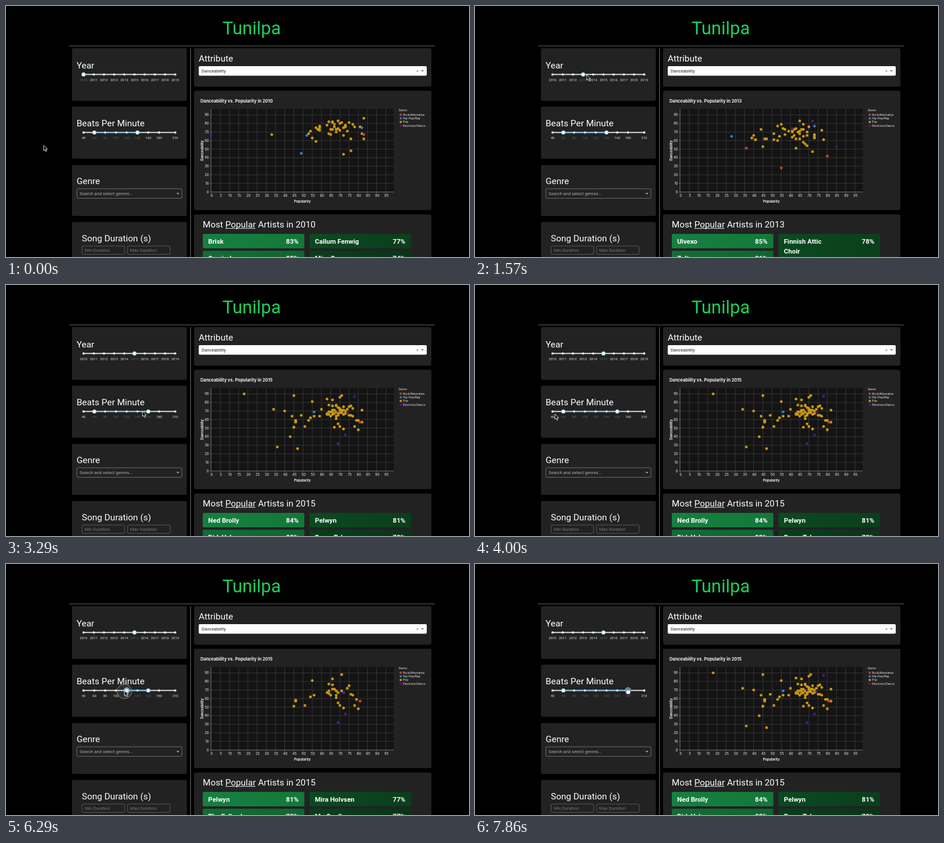
These frames come from a looping animation (800x434 px, 8 s). An HTML page with a canvas:

```html
<!DOCTYPE html>
<html lang="en">
<head>
<meta charset="utf-8">
<title>Music dashboard</title>
<style>
html, body { margin: 0; width: 100%; height: 100%; overflow: hidden; background: #000; }
canvas { display: block; width: 800px; height: 434px; }
</style>
</head>
<body>
<canvas id="stage"></canvas>
<script>
const W = 800, H = 434, LOOP = 8000, STEP = 1000 / 7;
const canvas = document.getElementById('stage');
const ctx = canvas.getContext('2d');
const ratio = window.devicePixelRatio || 1;
canvas.width = W * ratio;
canvas.height = H * ratio;

const PANEL = '#222', WHITE = '#fff', DIM = '#5c5c5c', BLUE = '#82c4ea', GRID = '#3e3e3e';
const GENRES = {
  rock: ['Rock/Alternative', '#cb4428'],
  hip: ['Hip-Hop/Rap', '#2c7fc9'],
  pop: ['Pop', '#c9970f'],
  edm: ['Electronic/Dance', '#4a1c82']
};

// Clouds: count, mean and spread of popularity, mean and spread of danceability.
// Lone songs stand apart from the clouds.
const YEARS = {
  2010: {
    clouds: [[40, 67, 7, 72, 7]], edm: 0,
    lone: { pop: [[33, 67], [72, 44], [76, 48]], hip: [[49, 45], [52, 66], [82, 75]], rock: [[83, 67]], edm: [[0, 67]] }
  },
  2013: {
    clouds: [[12, 47, 5, 65, 6], [38, 66, 6, 66, 9]], edm: 0.05,
    lone: { hip: [[28, 65], [73, 77]], rock: [[36, 51], [55, 28], [80, 42]], edm: [[72, 83], [85, 53]] }
  },
  2015: {
    clouds: [[16, 48, 6, 66, 11], [60, 70, 6, 69, 9]], edm: 0.05,
    lone: { pop: [[18, 90], [34, 72], [36, 28], [47, 26]], hip: [[56, 69]], rock: [[81, 57]], edm: [[69, 32], [73, 42]] }
  }
};

const ARTISTS = {
  2010: ['Brisk|83', 'Callum Fenwig|77', 'Ozmirel|83', 'Miss Dovra|74'],
  2013: ['Ulvexo|85', 'Finnish Attic/Choir|78', 'Zu!t|81'],
  2015: ['Ned Brolly|84', 'Pelwyn|81', 'Dirk Valsen|83', 'Kip Zonto|77'],
  wide: ['Ned Brolly|84', 'Pelwyn|81', 'Dirk Valsen|83', 'Bryce Talvor|78'],
  fast: ['Pelwyn|81', 'Mira Holvsen|77', 'The Fallowk|79', 'Mr. Quolb|77']
};

// Cursor tip: time, x, y
const path = [
  [200, 65, 241], [950, 188, 119], [1570, 193, 119], [2150, 220, 119], [2450, 220, 119],
  [2850, 228, 217], [3200, 246, 217], [3720, 106, 234], [4000, 138, 223], [4400, 153, 217],
  [5140, 185, 217], [5700, 187, 218], [6400, 206, 219], [7100, 153, 217], [7570, 246, 217],
  [7860, 264, 217]
];
const clicks = [1000, 2200];
const lowDrags = [[4400, 7100]];
const highDrags = [[2850, 3200], [7570, LOOP]];
const updates = [0, ...clicks, 3250, 5400, 7250];

const clamp = (v, a, b) => Math.min(b, Math.max(a, v));
const within = (t, spans) => spans.some(([a, b]) => t >= a && t < b);
const px = p => 354.3 + p * 3.18;
const py = d => 321.5 - d * 1.48;
const bpmX = v => 134 + (v - 40) * 0.932;
const yearX = v => 134 + (v - 2010) * 17.6;
const range = (n, f) => Array.from({ length: n }, (_, i) => f(i));

function random(seed) {
  return () => {
    seed = (seed * 16807) % 2147483647;
    return seed / 2147483647;
  };
}

function makeSongs(year) {
  const { clouds, edm, lone } = YEARS[year];
  const rnd = random(year * 31);
  const spread = () => (rnd() + rnd() + rnd() - 1.5) * 2;
  const songs = [];
  for (const [n, p, sp, d, sd] of clouds)
    for (let i = 0; i < n; i++)
      songs.push({
        p: Math.min(84, Math.round(p + spread() * sp)),
        d: Math.min(88, Math.round(d + spread() * sd)),
        genre: rnd() < edm ? 'edm' : 'pop',
        bpm: 60 + rnd() * 80
      });
  for (const [genre, spots] of Object.entries(lone))
    for (const [p, d] of spots)
      songs.push({ p, d, genre, bpm: genre === 'rock' || genre === 'edm' ? 120 : 80 });
  return songs;
}
const library = Object.fromEntries(Object.keys(YEARS).map(y => [y, makeSongs(+y)]));

function cursorAt(t) {
  const i = path.findIndex(k => k[0] > t);
  if (i < 1) return (i ? path[path.length - 1] : path[0]).slice(1);
  const [t0, x0, y0] = path[i - 1], [t1, x1, y1] = path[i];
  const u = (t - t0) / (t1 - t0), e = u * u * (3 - 2 * u);
  return [x0 + (x1 - x0) * e, y0 + (y1 - y0) * e];
}

// A dragged handle snaps to the mark nearest the cursor
function dragged(t, drags, rest) {
  const drag = drags.filter(d => d[0] <= t).pop();
  if (!drag) return rest;
  const x = cursorAt(Math.min(t, drag[1]))[0];
  return 40 + 20 * Math.round((x - 134) / 0.932 / 20);
}

function stateAt(t) {
  const click = clicks.filter(c => c <= t).pop();
  return {
    year: click ? 2010 + Math.round((cursorAt(click)[0] - 134) / 17.6) : 2010,
    lo: dragged(t, lowDrags, 60),
    hi: dragged(t, highDrags, 140)
  };
}

function box(x, y, w, h, fill, r = 3, stroke) {
  ctx.beginPath();
  ctx.roundRect(x, y, w, h, r);
  if (fill) { ctx.fillStyle = fill; ctx.fill(); }
  if (stroke) { ctx.strokeStyle = stroke; ctx.lineWidth = 0.8; ctx.stroke(); }
}

function line(x0, y0, x1, y1, color, width = 0.8) {
  ctx.strokeStyle = color;
  ctx.lineWidth = width;
  ctx.beginPath();
  ctx.moveTo(x0, y0);
  ctx.lineTo(x1, y1);
  ctx.stroke();
}

function dot(x, y, r, fill, stroke, width = 1) {
  ctx.beginPath();
  ctx.arc(x, y, r, 0, Math.PI * 2);
  if (fill) { ctx.fillStyle = fill; ctx.fill(); }
  if (stroke) { ctx.strokeStyle = stroke; ctx.lineWidth = width; ctx.stroke(); }
}

// y is the middle of the capitals
function text(s, x, y, size, color = WHITE, align = 'left', weight = 400, family = 'Roboto') {
  ctx.font = `${weight} ${size}px ${family}, sans-serif`;
  ctx.fillStyle = color;
  ctx.textAlign = align;
  ctx.fillText(s, x, y + size * 0.356);
}

const heading = (s, x, y) => text(s, x, y, 15.45);
const chartText = (s, x, y, size, align, weight) =>
  text(s, x, y, size, '#f2f2f2', align, weight, 'Inter');

function caret(x, y, color) {
  ctx.fillStyle = color;
  ctx.beginPath();
  ctx.moveTo(x - 2.6, y - 1.3);
  ctx.lineTo(x + 2.6, y - 1.3);
  ctx.lineTo(x, y + 1.5);
  ctx.fill();
}

function handle(x, y, hot) {
  if (hot) dot(x, y, 5.6, 'rgba(130,196,234,.75)');
  dot(x, y, 3, '#f4fbfc', '#a9d8e4', 1.1);
}

function slider(y, marks, toX, lo, hi, hot) {
  line(134, y, 292.5, y, '#f0f0f0', 1.8);
  if (lo !== hi) line(toX(lo), y, toX(hi), y, BLUE, 1.8);
  for (const v of marks) {
    const on = v >= lo && v <= hi;
    dot(toX(v), y, 1.7, WHITE, on ? BLUE : '#eee', 0.6);
    text(v, toX(v), y + 9.3, 5.9, on ? DIM : '#e0e0e0', 'center');
  }
  for (const v of new Set([lo, hi])) handle(toX(v), y, hot.includes(v));
}

function field(label, x, y, w, h, border, color) {
  box(x, y, w, h, null, 2, border);
  text(label, x + 4.6, y + h / 2, 7.7, color);
}

function controls(t, { year, lo, hi }) {
  for (const [y, h] of [[73, 91], [174, 90], [275, 88], [373.5, 70]]) box(114, y, 198.5, h, PANEL);
  heading('Year', 122, 102);
  slider(118.4, range(10, i => 2010 + i), yearX, year, year, within(t, [[2150, 2550]]) ? [year] : []);

  heading('Beats Per Minute', 122, 202);
  const hot = [];
  if (within(t, [[5900, 7200]])) hot.push(lo);
  if (within(t, highDrags)) hot.push(hi);
  slider(218.7, [...range(8, i => 40 + 20 * i), 210], bpmX, lo, hi, hot);

  heading('Genre', 122, 302.5);
  field('Search and select genres...', 122.5, 316, 181.5, 16.5, '#808080', '#aaa');
  caret(297, 324.5, '#aaa');

  heading('Song Duration (s)', 131, 401.5);
  field('Min Duration', 131.4, 415, 73.6, 14.4, '#686868', '#777');
  field('Max Duration', 210, 415, 73.6, 14.4, '#686868', '#777');
}

function chart({ year, lo, hi }) {
  box(325, 146.5, 410, 206.5, PANEL);
  chartText(`Danceability vs. Popularity in ${year}`, 336, 164.5, 7.4, 'left', 700);
  box(354.3, 178, 315.7, 143.5, '#141414', 0);
  for (let p = 0; p <= 95; p += 5) {
    line(px(p), 178, px(p), 321.5, GRID);
    line(px(p), 321.5, px(p), 324, '#888', 0.6);
    chartText(p, px(p) + 1, 327.5, 5.9, 'center');
  }
  for (let d = 0; d <= 90; d += 10) {
    line(354.3, py(d), 670, py(d), GRID);
    line(352, py(d), 354.3, py(d), '#888', 0.6);
    chartText(d, 350.5, py(d), 5.9, 'right');
  }
  line(354.3, 178, 354.3, 321.5, '#777');
  line(354.3, 321.5, 670, 321.5, '#777');
  chartText('Popularity', 512, 337.5, 5.7, 'center', 700);
  ctx.save();
  ctx.translate(339, 250);
  ctx.rotate(-Math.PI / 2);
  chartText('Danceability', 0, 0, 5.8, 'center', 700);
  ctx.restore();

  chartText('Genre', 678.5, 180.3, 5.1);
  Object.values(GENRES).forEach(([name, color], i) => {
    const y = 188 + i * 6.3;
    dot(682, y, 2, color);
    chartText(name, 686, y, 4.8);
  });

  for (const s of library[year])
    if (s.bpm >= lo && s.bpm <= hi) dot(px(s.p), py(s.d), 2.4, GENRES[s.genre][1]);
}

function artists({ year, lo, hi }) {
  box(325, 360.5, 410, 90, PANEL);
  text(`Most Popular Artists in ${year}`, 340, 377.5, 15.35);
  line(379, 384.6, 431, 384.6, WHITE, 0.9);
  const rows = ARTISTS[lo > 60 ? 'fast' : hi > 140 ? 'wide' : year];
  rows.forEach((row, i) => {
    const [name, score] = row.split('|');
    const lines = name.split('/');
    const x = i % 2 ? 524.5 : 340, y = i < 2 ? 394 : 423.3;
    const [from, to] = i % 2 ? ['#0a4a20', '#0b3e1c'] : ['#168040', '#137838'];
    const fill = ctx.createLinearGradient(x, 0, x + 175.5, 0);
    fill.addColorStop(0, from);
    fill.addColorStop(1, to);
    box(x, y, 175.5, lines.length > 1 ? 45 : 25, fill, 2);
    if (i > 1) box(x, y, 175.5, 25, 'rgba(0,0,0,.15)', 2);
    lines.forEach((s, k) => text(s, x + 9.3, y + 12.7 + k * 17.2, 11.5, WHITE, 'left', 700));
    text(score + '%', x + 165.5, y + 12.7, 11.5, WHITE, 'right', 700);
  });
}

function arrow(x, y) {
  ctx.beginPath();
  [[0, 0], [0, 9.2], [2.1, 7.3], [3.6, 10.6], [5.2, 9.9], [3.8, 6.7], [6.6, 6.6]]
    .forEach(([dx, dy]) => ctx.lineTo(x + dx, y + dy));
  ctx.closePath();
  ctx.fillStyle = '#080808';
  ctx.strokeStyle = '#f0f0f0';
  ctx.lineWidth = 0.9;
  ctx.fill();
  ctx.stroke();
}

function hand(x, y) {
  for (let i = 0; i < 4; i++)
    box(x - 2.8 + i * 1.7, y - (i % 3 ? 3.5 : 2.7), 1.7, 6, WHITE, 0.8, '#222');
  box(x - 3.6, y + 0.3, 7.6, 5.8, WHITE, 2.2, '#222');
  box(x - 2.5, y - 0.6, 6, 4.8, WHITE, 0.8);
}

function cursor(t) {
  const [x, y] = cursorAt(t);
  if (within(t, [[6150, 6450]])) dot(x, y + 1.5, 12.5, 'rgba(160,160,160,.1)', '#858585');
  if (within(t, [[2150, 2550], ...highDrags])) hand(x + 0.5, y + 2);
  else arrow(x, y);
}

function draw(t) {
  ctx.setTransform(ratio, 0, 0, ratio, 0, 0);
  ctx.fillStyle = '#000';
  ctx.fillRect(0, 0, W, H);
  text('Tunilpa', 424.5, 38.3, 31.1, '#1ed05a', 'center');
  line(109, 69, 741, 69, '#666', 1.1);
  line(318.8, 73, 318.8, H, '#5c5c5c', 1.3);

  // Chart and artists refresh only when a handle is released
  const shown = stateAt(updates.filter(u => u <= t).pop());
  controls(t, stateAt(t));
  box(325, 73, 410, 66.5, PANEL);
  heading('Attribute', 333, 90.3);
  box(333, 104, 394, 16.5, WHITE, 2);
  text('Danceability', 338, 112.2, 7.7, '#222');
  text('×', 711, 112, 8, '#777', 'center');
  caret(719.5, 112.3, '#777');
  chart(shown);
  artists(shown);
  cursor(t);
}

const start = performance.now();
function tick() {
  const t = (performance.now() - start) % LOOP;
  draw(clamp(Math.floor((t + 2) / STEP) * STEP, 0, LOOP - 1));
  requestAnimationFrame(tick);
}
tick();
</script>
</body>
</html>
```
